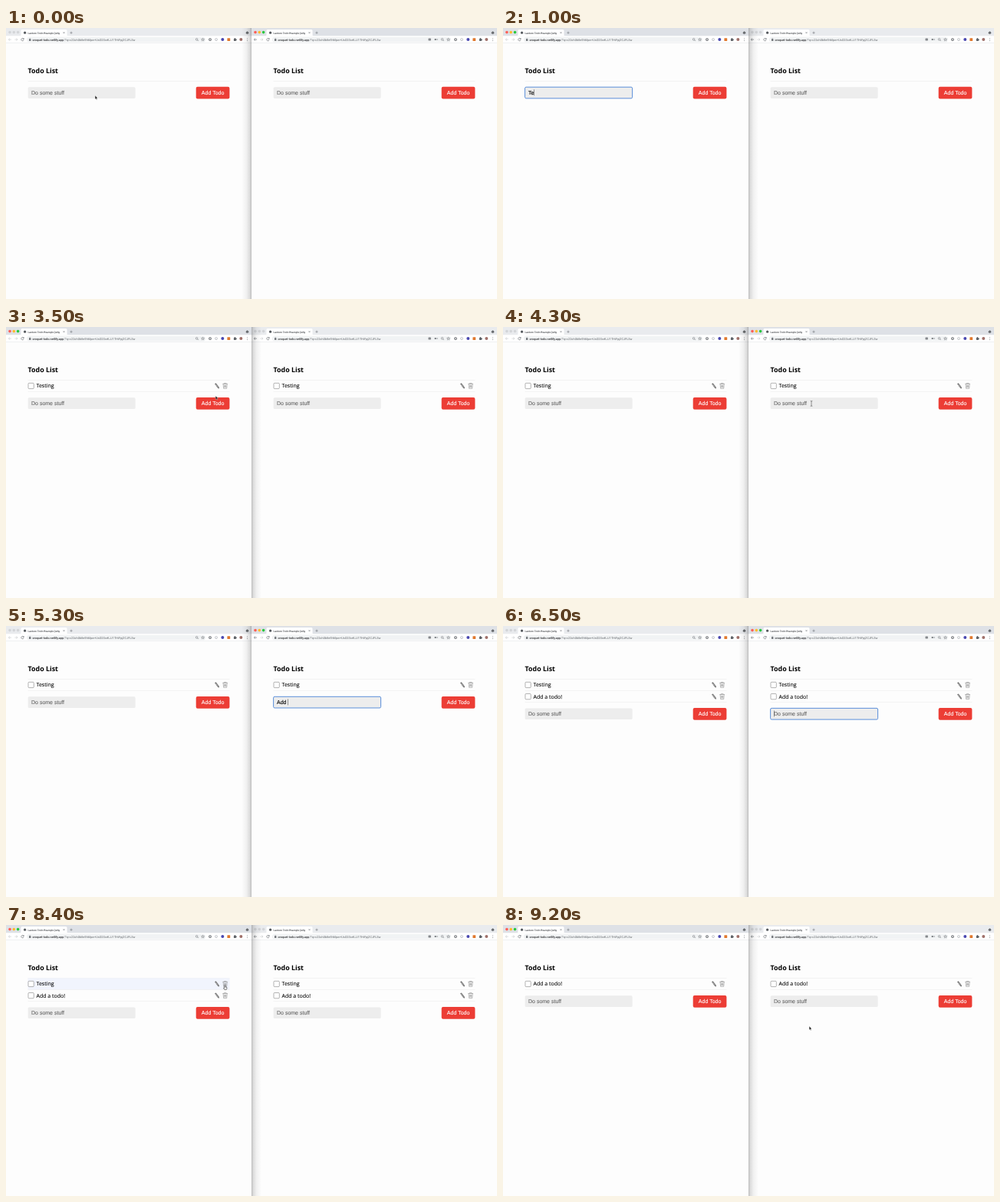
These frames come from a looping animation (640x354 px, 9300 ms). An HTML page:

```html
<!DOCTYPE html>
<html lang="en">
<head>
<meta charset="utf-8">
<title>Shared todo list</title>
<style>
html, body { margin: 0; width: 100%; height: 100%; overflow: hidden; background: #fdfdfd; }
svg { display: block; width: 640px; height: 354px; text-rendering: geometricPrecision; }
.ui { font-family: Roboto, sans-serif; stroke-width: .06; }
.field { font: 7px "Liberation Sans", Arial, sans-serif; stroke-width: .14; }
.item { font: 7px "Open Sans", sans-serif; stroke-width: .08; }
.title { font: bold 8.9px "Open Sans", sans-serif; stroke-width: 0; }
</style>
</head>
<body>
<svg id="stage" viewBox="0 0 640 354">
  <defs>
    <linearGradient id="shade">
      <stop offset="0" stop-opacity=".27"/>
      <stop offset=".15" stop-opacity=".14"/>
      <stop offset=".5" stop-opacity=".05"/>
      <stop offset="1" stop-opacity="0"/>
    </linearGradient>
  </defs>
  <g id="scene"></g>
</svg>
<script>
const LOOP = 9300, STEP = 100;
const scene = document.getElementById('scene');

const rect = (x, y, w, h, fill, r = 0, more = '') =>
  `<rect x="${x}" y="${y}" width="${w}" height="${h}" rx="${r}" fill="${fill}" ${more}/>`;
const dot = (x, y, r, fill) => `<circle cx="${x}" cy="${y}" r="${r}" fill="${fill}"/>`;
const line = (d, color, width = .7) =>
  `<path d="${d}" fill="none" stroke="${color}" stroke-width="${width}"/>`;
const text = (x, y, str, cls, fill = '#000', more = '') =>
  `<text x="${x}" y="${y}" class="${cls}" fill="${fill}" stroke="${fill}" xml:space="preserve" ${more}>${str}</text>`;

// Typed keys: [time, text so far]
const typedLeft = [[1000, 'Te'], [1100, 'Tes'], [1300, 'Test'], [1400, 'Testi'], [1500, 'Testin'], [1600, 'Testing']];
const typedRight = [[4900, 'A'], [5100, 'Ad'], [5200, 'Add'], [5300, 'Add '], [5400, 'Add a'], [5500, 'Add a '],
  [5800, 'Add a t'], [5900, 'Add a to'], [6000, 'Add a tod'], [6100, 'Add a todo'], [6200, 'Add a todo!']];

// Pointer stops: [time, x, y, shape]; an empty shape hides it
const stops = [
  [0, 116, 88, 'arrow'], [100, 115, 87, 'arrow'], [200, 112, 85, 'beam'], [500, 99, 82, 'beam'],
  [700, 70, 108, 'arrow'], [800, 30, 99, 'arrow'], [1000, 30, 99, ''],
  [2500, 126, 84, 'beam'], [2700, 126, 84, 'beam'], [2800, 180, 95, 'arrow'], [3000, 262, 86, 'hand'],
  [3200, 266, 86, 'hand'], [3400, 270, 88, 'arrow'], [3500, 273, 89.6, 'arrow'], [3600, 275, 90, 'arrow'],
  [3800, 275, 90, 'arrow'], [4000, 360, 98, 'beam'], [4300, 402, 100, 'beam'], [4600, 402, 100, 'beam'],
  [4700, 403, 123, 'arrow'], [4900, 403, 123, ''],
  [7000, 595, 98, 'arrow'], [7100, 430, 108, 'arrow'], [7200, 255, 101, 'arrow'], [7400, 280, 82, 'arrow'],
  [7600, 285, 79, 'arrow'], [7800, 285.5, 79, 'hand'], [8600, 285.5, 79, 'hand'], [8700, 300, 95, 'arrow'],
  [8900, 371, 125, 'arrow'], [9000, 380, 128, 'arrow'], [9200, 399, 132, 'arrow']];

const latest = (list, t) => list.filter(k => k[0] <= t).pop();
const within = (t, a, b) => t >= a && t < b;

function pointerAt(t) {
  const a = latest(stops, t), b = stops[stops.indexOf(a) + 1] || a;
  const k = b === a ? 0 : (t - a[0]) / (b[0] - a[0]);
  return { x: a[1] + (b[1] - a[1]) * k, y: a[2] + (b[2] - a[2]) * k, shape: a[3] };
}

function drawPointer({ x, y, shape }) {
  const shapes = {
    arrow: '<path d="M.2.3V4.9L1.2 4L2 5.7L2.7 5.3L2 3.7H3.4Z" fill="#111" stroke="#fff" stroke-width=".3"/>',
    beam: line('M-1.3-3.5Q0-3.5 0-2.5V2.5Q0 3.5-1.3 3.5M1.3-3.5Q0-3.5 0-2.5M0 2.5Q0 3.5 1.3 3.5', '#333', .5),
    hand: '<path d="M-.6 0Q0-.7 .6 0V2L2.4 2.5V4L1.8 5.4H-.8L-2 3.2L-1.4 2.7L-.6 3.4Z" fill="#fff" stroke="#000" stroke-width=".5"/>'
  };
  return shape ? `<g transform="translate(${x} ${y})">${shapes[shape]}</g>` : '';
}

function chrome(active, right) {
  const ink = '#5f6368', pale = '#c4c7ca';
  const lights = active ? ['#fe5f57', '#febc2e', '#28c840'] : Array(3).fill('#d3d5d8');
  const extra = right
    ? rect(230.5, 13.6, 3.4, 2.8, '#85888c', .4) + dot(239.6, 15, 1, ink) + line('M240.6 15H243', ink, .6) : '';
  return rect(0, 0, 320, 10.5, active ? '#dee1e6' : '#e9ebee')
    + lights.map((c, i) => dot(5 + i * 5.3, 5.6, 1.8, c)).join('')
    + '<path d="M18 10.5Q19.5 10.5 19.5 9V3.5Q19.5 2 21 2H78Q79.5 2 79.5 3.5V9Q79.5 10.5 81 10.5Z" fill="#fff"/>'
    + dot(24.6, 6.2, 1.6, '#55595e')
    + text(28.5, 7.5, 'Lantern Todo Example (why', 'ui', '#3f4246', 'font-size="3.4"')
    + line('M74.5 5.2L76.5 7.2M76.5 5.2L74.5 7.2', ink, .5)
    + line('M83.4 6.2H86.6M85 4.6V7.8', ink, .5)
    + dot(314.5, 6.2, 1.7, '#5a5d61') + line('M313.8 6L314.5 6.7L315.2 6', '#fff', .4)
    + rect(0, 10.5, 320, 9, '#fff') + rect(0, 19.2, 320, .6, '#dfe1e4')
    + rect(27, 11.8, 233, 6.8, '#f1f3f4', 3.4)
    + line('M7 15.1H3.4M5 13.5L3.4 15.1L5 16.7', right ? ink : pale, .6)
    + line('M11.4 15.1H15M13.4 13.5L15 15.1L13.4 16.7', pale, .6)
    + line('M23 14.3A1.7 1.7 0 1 0 23.1 15.8M23.2 13.1V14.7H21.7', ink, .6)
    + rect(30, 14.6, 2.4, 2.1, ink, .3) + line('M30.6 14.7V13.9Q31.2 13 31.8 13.9V14.7', ink, .4)
    + text(34.5, 16.5, 'croquet-todo.netlify.app<tspan fill="#63676c" stroke="none">/?q=c22oh0b8e5hMpw+UsO2SsrKJJ1THiFpjZCJFLSw</tspan>',
      'ui', '#202124', 'font-size="3.86"')
    + extra
    + `<circle cx="248.6" cy="14.8" r="1.3" fill="none" stroke="${ink}" stroke-width=".5"/>` + line('M249.5 15.7L250.8 17', ink, .6)
    + line('M256.6 13.1L257.2 14.5H258.6L257.5 15.4L257.9 16.9L256.6 16L255.3 16.9L255.7 15.4L254.6 14.5H256Z', ink, .45)
    + dot(266, 15.1, 1.9, '#65686d') + dot(266, 15.1, .9, '#fff')
    + dot(274, 15.1, 1.8, '#b4b7bd') + dot(274, 15.1, 1, '#fff')
    + dot(282.3, 15.1, 2, '#4a48b0')
    + rect(288.4, 13.3, 3.8, 3.6, '#e0792f', .5)
    + rect(296.9, 13.9, 3, 3, ink, .4) + dot(298.4, 13.7, .8, ink) + dot(300, 15.4, .8, ink)
    + dot(306.3, 15.1, 2, '#a0706a')
    + [13.4, 15.1, 16.8].map(y => dot(314.4, y, .45, ink)).join('');
}

function row(label, i, hover) {
  const y = 69.4 + i * 15.2;
  const bg = hover ? rect(28.5, y, 263, 15, '#f1f4fd') : '';
  return bg + `<g transform="translate(0 ${y})">`
    + rect(29, 3.9, 7.3, 7.3, '#fff', 1.1, 'stroke="#808080" stroke-width=".6"')
    + text(39.5, 10.1, label, 'item')
    + '<path d="M272.5 4.9L273.6 4.3L277.2 9L277.5 10.7L276 10Z" fill="#888" stroke="#333" stroke-width=".5"/>'
    + line('M273.3 5.6L276.5 9.7', '#ddd', .5)
    + line('M282.3 4.9H288.9M284.2 4.9V4.1H287.1V4.9M283.1 4.9L283.6 10.9H287.7L288.2 4.9M284.7 6.3V9.7M285.7 6.3V9.7M286.7 6.3V9.7', '#777', .5)
    + '</g>' + rect(28.5, y + 14.8, 263, .6, '#ededed');
}

function page({ items, typed, focus, caret, hover }) {
  const y = 77 + items.length * 15.1;
  const ring = focus ? 'stroke="#4a84d6" stroke-width=".9"' : '';
  const end = 33 + caretWidth(typed);
  return rect(0, 19.8, 320, 334.2, '#fdfdfd')
    + text(28.5, 59.4, 'Todo List', 'title')
    + rect(28.5, 69, 263, .6, '#ededed')
    + items.map((label, i) => row(label, i, hover === i)).join('')
    + rect(28.6, y + .2, 140, 14.7, '#ededed', 1.6, ring)
    + text(33, y + 9.9, typed || 'Do some stuff', 'field', typed ? '#000' : '#6e6e6e')
    + (caret ? rect(end, y + 3.3, .5, 8, '#333') : '')
    + rect(247.7, y - .2, 43.7, 15.8, '#ec3d35', 2)
    + text(269.6, y + 10.1, 'Add Todo', 'field', '#fff', 'text-anchor="middle"');
}

const ruler = document.createElement('canvas').getContext('2d');
ruler.font = '70px "Liberation Sans", Arial, sans-serif';
const caretWidth = str => ruler.measureText(str).width / 10;

function draw(t) {
  const pointer = pointerAt(t);
  const leftActive = within(t, 200, 4100) || t >= 7800;
  const items = [];
  if (within(t, 3200, 8600)) items.push('Testing');
  if (t >= 6500) items.push('Add a todo!');
  const typing = (list, sent) => t < sent ? (latest(list, t) || [0, ''])[1] : '';

  let hover = -1;
  if (leftActive && pointer.shape && pointer.x > 28 && pointer.x < 292) {
    const i = Math.floor((pointer.y - 69.4) / 15.2);
    if (i < items.length) hover = i;
  }
  const left = {
    items, hover, typed: typing(typedLeft, 3200), focus: within(t, 200, 3200),
    caret: within(t, 200, 700) || within(t, 1000, 2200) || within(t, 2600, 3200)
  };
  const right = {
    items, hover: -1, typed: typing(typedRight, 6500), focus: within(t, 4600, 7800),
    caret: within(t, 4600, 6800) || within(t, 7300, 7800)
  };
  const shadow = rect(0, 0, 13, 354, 'url(#shade)');
  scene.innerHTML = chrome(leftActive, false) + page(left)
    + `<g transform="translate(320 0)">${chrome(!leftActive, true)}${page(right)}</g>`
    + `<g transform="translate(320 0) scale(${leftActive ? 1 : -1} 1)">${shadow}</g>`
    + drawPointer(pointer);
}

let shown = -1;
function tick(now) {
  const t = Math.floor(now % LOOP / STEP) * STEP;
  if (t !== shown) draw(shown = t);
  requestAnimationFrame(tick);
}
draw(0);
requestAnimationFrame(tick);
</script>
</body>
</html>
```
